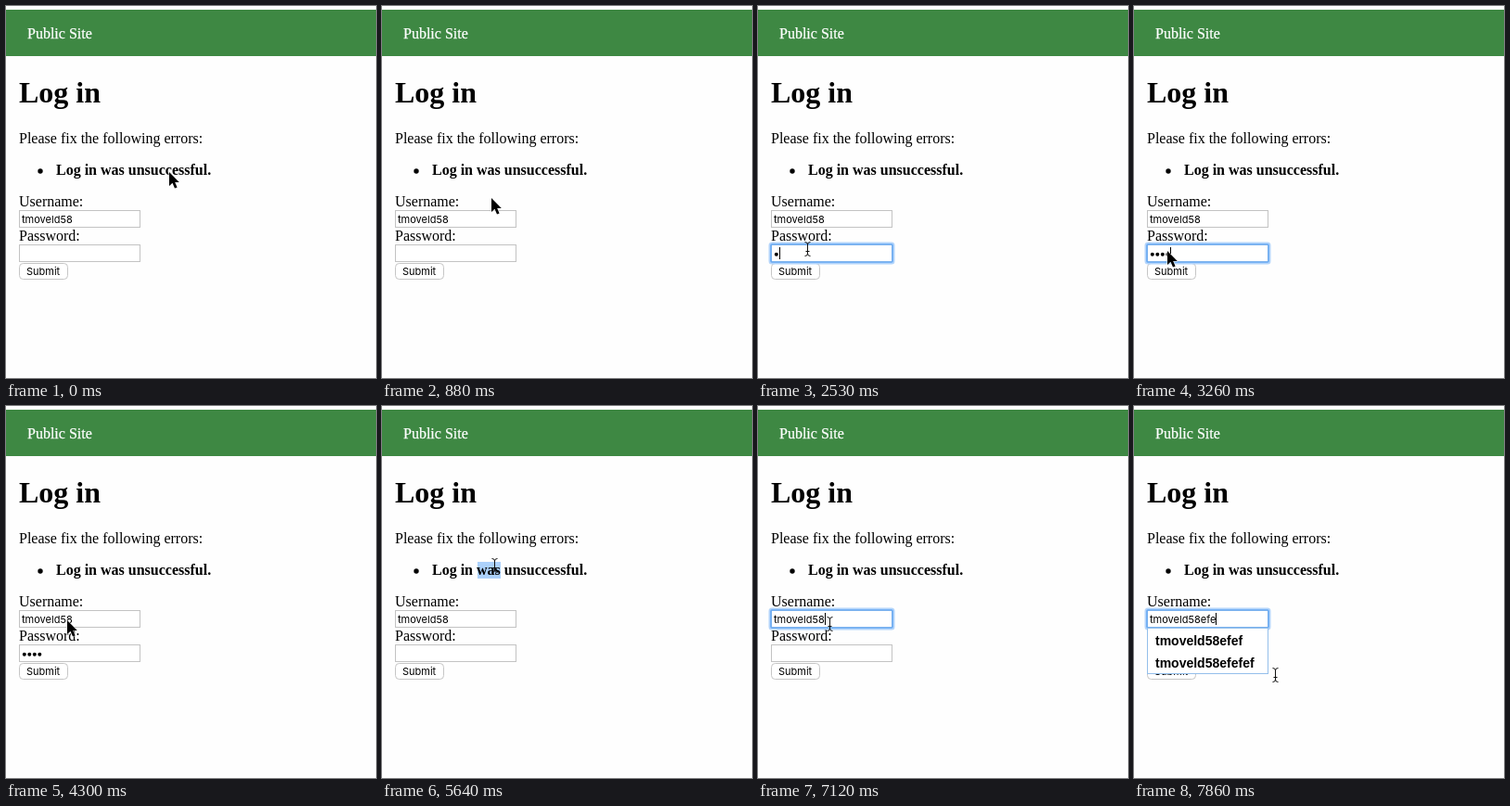
An HTML page that plays this animation: 399x401 px, repeating every 8 s.

```html
<!DOCTYPE html>
<html lang="en">
<head>
<meta charset="utf-8">
<title>Log in</title>
<style>
  html, body { margin: 0; width: 100%; height: 100%; overflow: hidden; background: #fefefe; }
  svg { display: block; }
  text { font: 16px "Liberation Serif", serif; white-space: pre; }
  .title { font-size: 32px; font-weight: bold; }
  .error { font-weight: bold; }
  .ui { font: 11px Inter, sans-serif; }
  .option { font: bold 14px "Liberation Sans", sans-serif; }
  .field { fill: #fff; stroke: #c3c3c3; }
  .ring rect { fill: none; }
</style>
</head>
<body>
<svg width="399" height="401" viewBox="0 0 399 401">
  <rect y="4" width="399" height="50" fill="#3e8843"/>
  <text x="23" y="35" fill="#fff" stroke="#fff" stroke-width=".25">Public Site</text>
  <text class="title" x="14" y="104">Log in</text>
  <text x="14" y="148">Please fix the following errors:</text>
  <rect id="selection" y="168" height="18" fill="#acd1fb"/>
  <circle cx="37" cy="178" r="2.7"/>
  <text class="error" x="54" y="182">Log in was unsuccessful.</text>
  <text x="14" y="216">Username:</text>
  <text x="14" y="253">Password:</text>
  <rect class="field" x="14.5" y="220.5" width="130" height="18"/>
  <rect class="field" x="14.5" y="257.5" width="130" height="18"/>
  <rect x="14.5" y="277.5" width="52" height="17" rx="4" fill="#fff" stroke="#c6c6c6"/>
  <text class="ui" x="22" y="290">Submit</text>
  <g id="ring" class="ring">
    <rect x="13" y="219" width="133" height="21" rx="2" stroke="#b4d5fb" stroke-width="3"/>
    <rect x="14" y="220" width="131" height="19" rx="1" stroke="#68aaf3" stroke-width="1.6"/>
  </g>
  <text id="username" class="ui" x="17" y="234"></text>
  <g id="dots"></g>
  <g id="popup">
    <rect x="14.5" y="239.5" width="130" height="49" fill="#fff" stroke="#94bfeb"/>
    <text class="option" x="23" y="258"></text>
    <text class="option" x="23" y="282"></text>
  </g>
  <rect id="caret" width="1" height="13"/>
  <path id="arrow" d="M0 0V15L3.5 11.8L6 17.5L8.6 16.4L6.2 11H10.8Z" stroke="#fff" stroke-linejoin="round" paint-order="stroke"/>
  <path id="beam" d="M-3-7.5Q0-7.5 0-5V5Q0 7.5-3 7.5M3-7.5Q0-7.5 0-5M0 5Q0 7.5 3 7.5M-2 2.5H2" fill="none" stroke="#111"/>
</svg>
<script>
const LOOP = 8000, TICK = 148.3, USER = "tmoveld58";
const $ = id => document.getElementById(id);
const show = (el, on) => el.style.display = on ? "" : "none";

// Pointer waypoints: tick, x, y, text cursor
const path = [
  [0, 176, 179], [1, 168, 176, 1], [3, 140, 190], [8, 85, 233], [10, 75, 266], [11, 75, 266],
  [12, 54, 262, 1], [19, 54, 262, 1], [20, 44, 261], [22, 36, 264], [26, 33, 281], [28, 33, 281],
  [29, 66, 231], [31, 124, 182], [33, 122, 172, 1], [41, 122, 172, 1], [42, 115, 201],
  [44, 84, 239], [46, 78, 235, 1], [50, 78, 235, 1], [51, 153, 290, 1]
];
const keyTicks = [17, 18, 20, 21];

const dots = keyTicks.map((_, i) => {
  const dot = document.createElementNS("http://www.w3.org/2000/svg", "circle");
  dot.setAttribute("cx", 19.8 + 5.5 * i);
  dot.setAttribute("cy", 267.7);
  dot.setAttribute("r", 2);
  return $("dots").appendChild(dot);
});
document.querySelectorAll(".option").forEach((el, i) => el.textContent = USER + "ef".repeat(i + 2));

function drawPointer(tick) {
  const i = path.findLastIndex(p => p[0] <= tick);
  const [t0, x0, y0, text] = path[i];
  const [t1, x1, y1] = path[i + 1] || [t0 + 1, x0, y0];
  const k = (tick - t0) / (t1 - t0);
  const x = Math.round(x0 + (x1 - x0) * k), y = Math.round(y0 + (y1 - y0) * k);
  show($("arrow"), !text);
  show($("beam"), text);
  $("arrow").setAttribute("transform", `translate(${x} ${y})`);
  $("beam").setAttribute("transform", `translate(${x - .5} ${y})`);
}

function drawSelection(tick) {
  const whole = tick >= 39;
  show($("selection"), tick >= 38 && tick < 47);
  $("selection").setAttribute("x", whole ? 54 : 103);
  $("selection").setAttribute("width", whole ? 168 : 25);
}

function drawFields(tick) {
  const typed = tick < 30 ? keyTicks.filter(k => k <= tick).length : 0;
  dots.forEach((dot, i) => show(dot, i < typed));
  $("username").textContent = USER + "efe".slice(0, Math.max(0, tick - 50));

  const inPassword = tick >= 13 && tick < 25, inUsername = tick >= 47;
  show($("ring"), inPassword || inUsername);
  show($("caret"), inPassword || inUsername);
  $("ring").setAttribute("transform", `translate(0 ${inPassword ? 37 : 0})`);
  const caretX = inPassword ? 17 + 5.5 * typed : 17 + $("username").getComputedTextLength();
  $("caret").setAttribute("x", Math.round(caretX));
  $("caret").setAttribute("y", inPassword ? 260 : 223);
  show($("popup"), tick >= 51);
}

function frame(now) {
  const tick = Math.floor((now % LOOP + 4) / TICK);
  drawPointer(tick);
  drawSelection(tick);
  drawFields(tick);
  requestAnimationFrame(frame);
}
frame(0);
</script>
</body>
</html>
```
